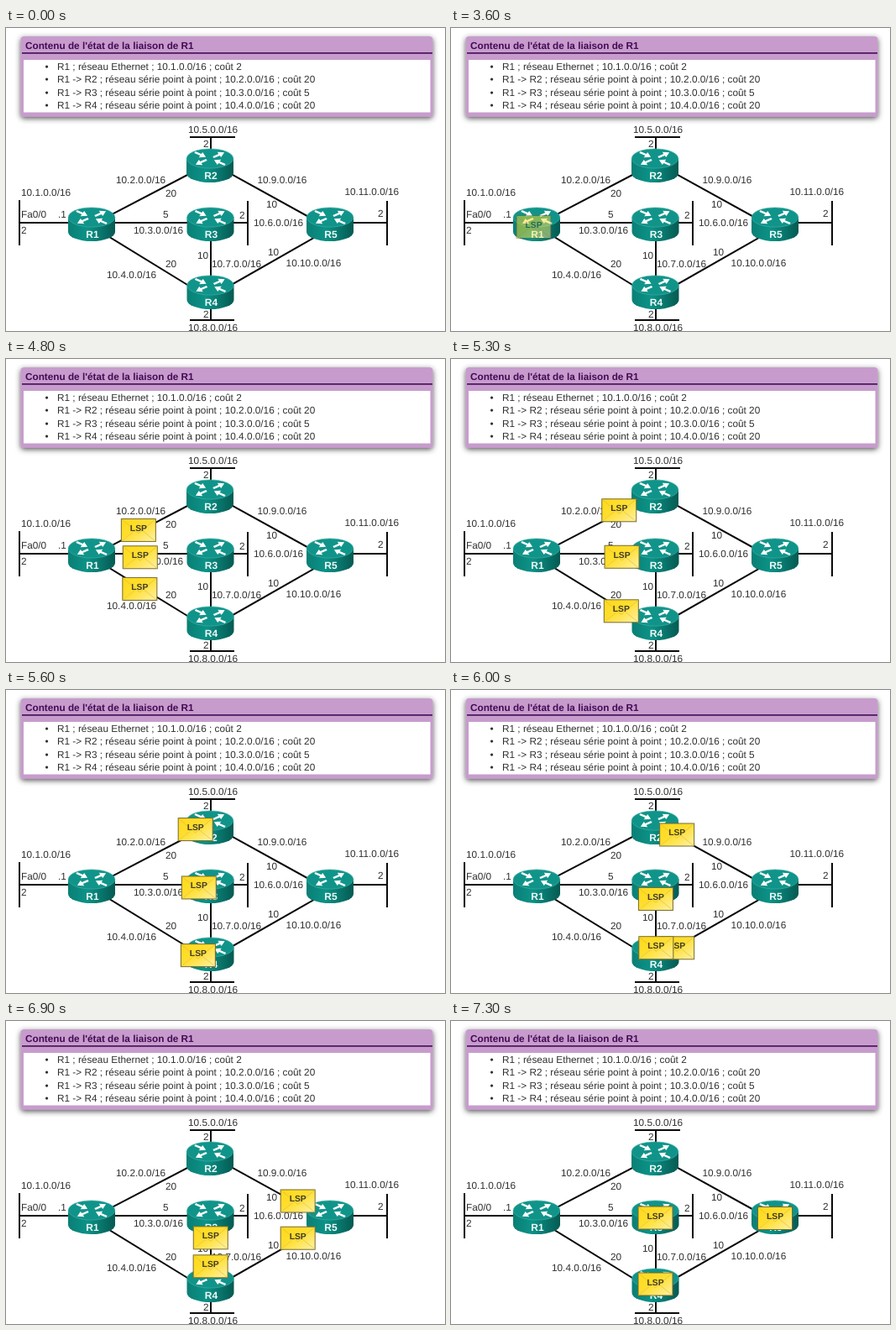
An HTML page that plays this animation: 523x361 px, repeating every 9 s.

```html
<!DOCTYPE html>
<html lang="fr">
<head>
<meta charset="utf-8">
<title>État de la liaison</title>
<style>
  html, body { margin: 0; width: 100%; height: 100%; overflow: hidden; background: #fff; }
  svg { display: block; width: 523px; height: 361px; }
  text { font: 11.8px "Liberation Sans", Arial, sans-serif; fill: #303030; text-rendering: geometricPrecision; white-space: pre; }
  .title { font-size: 11.75px; font-weight: bold; fill: #440a54; }
  .router { font-size: 12px; font-weight: bold; fill: #f0f8f7; text-anchor: middle; }
  .packet { font-size: 10.3px; font-weight: bold; fill: #403c28; text-anchor: middle; }
</style>
</head>
<body>
<svg viewBox="0 0 523 361">
  <defs>
    <filter id="shadow" x="-5%" y="-15%" width="110%" height="135%">
      <feDropShadow dx="0" dy="2" stdDeviation="3" flood-color="#333" flood-opacity=".85"/>
    </filter>
    <linearGradient id="side">
      <stop offset="0" stop-color="#0a7f75"/>
      <stop offset=".4" stop-color="#0c9287"/>
      <stop offset="1" stop-color="#055a52"/>
    </linearGradient>
    <linearGradient id="paper" x2="1" y2="1">
      <stop offset="0" stop-color="#ffd91c"/>
      <stop offset=".45" stop-color="#ffde2e"/>
      <stop offset="1" stop-color="#fff2a8"/>
    </linearGradient>
    <path id="arrow" d="M0-1.4H8V-4.6L15 0L8 4.6V1.4H0Z" fill="#fff"/>
    <g id="router">
      <path d="M-28-8V9.5A28 11 0 0 0 28 9.5V-8Z" fill="url(#side)"/>
      <ellipse cy="-8" rx="27.8" ry="11.6" fill="#10948a" stroke="#45b0a6" stroke-width=".6"/>
      <use href="#arrow" transform="translate(-18 -15.5) scale(1 .8) rotate(29)"/>
      <use href="#arrow" transform="translate(18 -.5) scale(1 .8) rotate(209)"/>
      <use href="#arrow" transform="translate(4 -9.5) scale(1 .8) rotate(-29)"/>
      <use href="#arrow" transform="translate(-4 -6.5) scale(1 .8) rotate(151)"/>
    </g>
    <g id="packet">
      <rect x="-20.5" y="-13.5" width="41" height="27" fill="url(#paper)" stroke="#75692a"/>
      <path d="M-20 13L-5 1M20 13L5 1" stroke="#e6c44a" stroke-width=".8"/>
      <path d="M-20-13L0 4L20-13" stroke="#e3c030" stroke-width=".8" fill="none"/>
      <text class="packet" y="1">LSP</text>
    </g>
  </defs>

  <rect x="17.5" y="10" width="491" height="95.8" rx="4" fill="#c79ccd" filter="url(#shadow)"/>
  <path d="M19 29.9H508" stroke="#4d1760" stroke-width="1.8"/>
  <rect x="21" y="38" width="484.5" height="62.5" fill="#fff"/>
  <text class="title" x="23" y="25">Contenu de l'état de la liaison de R1</text>

  <path fill="none" stroke="#0a0a0a" stroke-width="2" d="
    M102 234.6L243 161M102 232H288M102 236L243 322.5M243 160L386 239M243 320.5L386 239M244 233V314
    M16 205V259M16 232H102M454 206V259M386 232H454M288 206V259
    M219 130H273M244 130V163M219 348H272M244 314V348"/>
  <g id="routers"></g>
  <g id="labels"></g>
  <g id="packets"></g>
</svg>
<script>
const STEP = 100, LOOP = 9000;
const FADE_START = 36, FIRST_HOP = 41, SECOND_HOP = 57, HOP_STEPS = 16, SPEED = 0.061;
const byId = id => document.getElementById(id);
const label = (x, y, text) => `<text x="${x}" y="${y}">${text}</text>`;

const routers = [[102, 233.5], [243, 163.5], [243.5, 233.5], [243.5, 314.5], [386, 233.5]];
byId('routers').innerHTML = routers.map(([x, y], i) =>
  `<g transform="translate(${x} ${y})"><use href="#router"/><text class="router" x="1" y="16">R${i + 1}</text></g>`).join('');

const linkStates = [
  'R1 ; réseau Ethernet ; 10.1.0.0/16 ; coût 2',
  ...[[2, 20], [3, 5], [4, 20]].map(([n, cost]) =>
    `R1 -&gt; R${n} ; réseau série point à point ; 10.${n}.0.0/16 ; coût ${cost}`)
];
const networks = [
  [18, 200], [131, 185.4], [152, 245], [120, 297.6], [217, 125], [295, 236],
  [245, 285], [217, 361], [299.4, 184.8], [333.6, 284], [403.4, 199]
];
const costs = [
  [235, 142, 2], [190, 201, 20], [310, 213.6, 10], [443, 225, 2], [18, 226, 'Fa0/0'], [62, 226, '.1'],
  [18, 245, 2], [187, 226, 5], [278, 227, 2], [190, 285, 20], [228, 275, 10], [312, 271, 10], [235, 345, 2]
];
byId('labels').innerHTML =
  linkStates.map((text, i) => label(46.5, 50 + i * 15.4, '•') + label(61, 50 + i * 15.4, text)).join('') +
  networks.map(([x, y], i) => label(x, y, `10.${i + 1}.0.0/16`)).join('') +
  costs.map(c => label(...c)).join('');

// Each route: first step, start point, end point; later routes lie on top.
const origin = [98.5, 237];
const routes = [
  [FIRST_HOP, origin, [241, 323.5]],
  [FIRST_HOP, origin, [242, 235.3]],
  [FIRST_HOP, origin, [237.5, 159.5]],
  [SECOND_HOP, [243, 158.5], [386, 235]],
  [SECOND_HOP, [243, 323.5], [386, 235]],
  [SECOND_HOP, [244, 234.5], [243.5, 313.5]],
  [SECOND_HOP, [244.5, 323.5], [243.5, 234.5]]
];
byId('packets').innerHTML = '<use href="#packet"/>'.repeat(routes.length);
const packets = [...byId('packets').children];

function opacityAt(step, start) {
  if (start === SECOND_HOP) return step >= SECOND_HOP ? 1 : 0;
  if (step >= SECOND_HOP) return 0;
  return Math.max(0, Math.min(1, (step - FADE_START + 1) * 0.2));
}

function draw() {
  const step = Math.floor(performance.now() % LOOP / STEP);
  routes.forEach(([start, from, to], i) => {
    const moved = Math.max(0, step - start);
    const progress = moved >= HOP_STEPS ? 1 : moved * SPEED;
    const [x, y] = from.map((v, axis) => v + (to[axis] - v) * progress);
    packets[i].setAttribute('transform', `translate(${x} ${y})`);
    packets[i].setAttribute('opacity', opacityAt(step, start));
  });
  requestAnimationFrame(draw);
}
draw();
</script>
</body>
</html>
```
